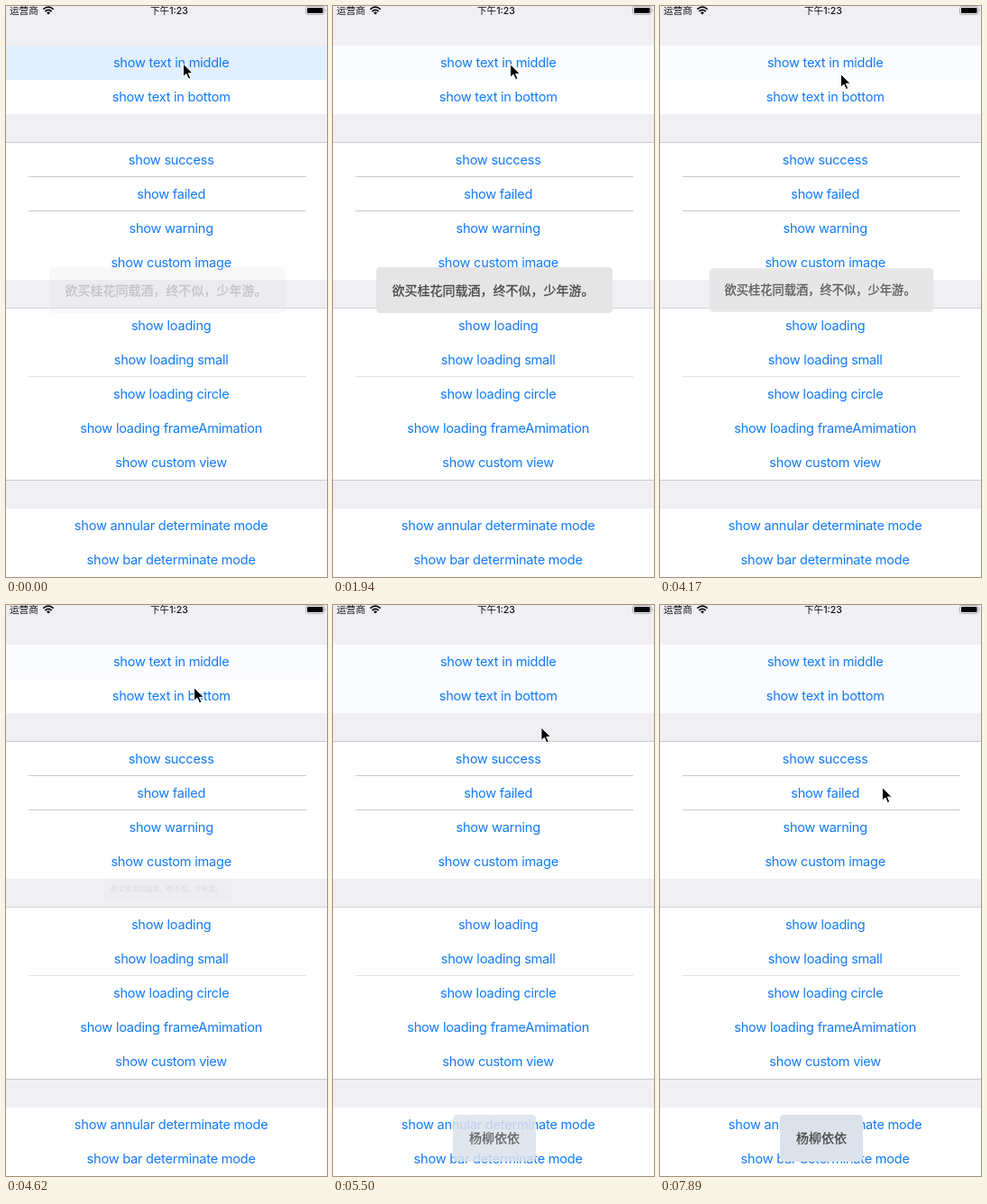
These frames come from a looping animation (356x634 px, 8000 ms). An HTML page:

```html
<!DOCTYPE html>
<html lang="zh-CN">
<head>
<meta charset="utf-8">
<title>HUD demo</title>
<style>
html, body { margin: 0; width: 100%; height: 100%; overflow: hidden; background: #efeff4; }
svg { display: block; width: 100vw; height: 100vh; }
.row { font: 400 14.6px Inter, "Liberation Sans", sans-serif; letter-spacing: -.25px; fill: #117af8; text-anchor: middle; }
.bar { font: 500 10.6px Inter, "Noto Sans CJK SC", "Noto Sans CJK", sans-serif; fill: #111; }
.hud text { font: 400 14px "Noto Sans CJK SC", "Noto Sans CJK", sans-serif; fill: #484848; stroke: #484848; stroke-width: .3px; }
</style>
</head>
<body>
<svg viewBox="0 0 356 634" xmlns="http://www.w3.org/2000/svg">
  <rect width="356" height="634" fill="#efeff4"/>
  <g id="table"></g>

  <g class="bar">
    <text x="4" y="9">运营商</text>
    <text x="181" y="9" text-anchor="middle">下午1:23</text>
  </g>
  <g fill="none" stroke="#000" stroke-width="1.7">
    <path d="M41.3 3.6Q47 -1.4 52.7 3.6M43.4 6Q47 2.8 50.6 6"/>
    <path d="M45 7.4Q47 5.8 49 7.4L47 9.6Z" fill="#000" stroke="none"/>
  </g>
  <rect x="332.5" y=".5" width="20.5" height="9" rx="2.2" fill="none" stroke="#a0a0a4" stroke-width=".8"/>
  <rect x="334" y="2" width="17.5" height="6" rx="1"/>
  <path d="M354 3.5q1.6 1.5 0 3z" fill="#a0a0a4"/>

  <g class="hud" id="middle">
    <rect x="48" y="290" width="262" height="51" rx="4.5" fill="#e5e5e5"/>
    <text x="65.5" y="320.5">欲买桂花同载酒，终不似，少年游。</text>
  </g>
  <g class="hud" id="bottom">
    <rect x="133" y="566" width="92" height="52" rx="4.5" fill="#dbe2eb"/>
    <text x="151" y="597">杨柳依依</text>
  </g>

  <path id="cursor" d="M0 0V14.6L3.4 11.5L5.9 17L8.3 16L5.9 10.7H10.6Z" stroke="#fff" stroke-linejoin="round"/>
</svg>
<script>
const $ = id => document.getElementById(id);
const LOOP = 8000, TICK = 148.5; // the picture refreshes once per tick
const ROW = 38, GAP = 32;

function add(name, attrs, text = '') {
  const el = document.createElementNS('http://www.w3.org/2000/svg', name);
  for (const k in attrs) el.setAttribute(k, attrs[k]);
  el.textContent = text;
  return $('table').appendChild(el);
}

const line = (y, inset, stroke = '#c9c9ce') =>
  add('line', { x1: inset, x2: inset ? 333 : 356, y1: y, y2: y, stroke });

const sections = [
  ['text in middle', 'text in bottom'],
  ['success', 'failed', 'warning', 'custom image'],
  ['loading', 'loading small', 'loading circle', 'loading frameAmimation', 'custom view'],
  ['annular determinate mode', 'bar determinate mode']
];
const cells = [];
let y = 44;
for (const labels of sections) {
  for (const label of labels) {
    cells.push(add('rect', { y, width: 356, height: ROW, fill: '#fff' }));
    add('text', { class: 'row', x: 183.2, y: y + 24.3 }, 'show ' + label);
    y += ROW;
  }
  y += GAP;
}
line(151.5, 0);
line(189.5, 25);
line(227.5, 25);
line(335.5, 0, '#d4d4d8');
line(411.5, 25, '#e2e2e5');
line(526.5, 0);

// eased progress from tick a to tick b
function ramp(t, a, b) {
  const p = Math.min(1, Math.max(0, (t - a) / (b - a)));
  return p * p * (3 - 2 * p);
}

const moves = [
  { from: 12, to: 19, x: 200.5, y: 75.5 },
  { from: 29, to: 32, x: 211.5, y: 97.5 },
  { from: 35, to: 41, x: 286.5, y: 245.5 },
  { from: 46, to: 51, x: 246.5, y: 202.5 }
];

function pointer(t) {
  let x = 196.5, y = 64;
  for (const m of moves) {
    const p = ramp(t, m.from, m.to);
    x += (m.x - x) * p;
    y += (m.y - y) * p;
  }
  return `translate(${x} ${y})`;
}

const idle = [250, 252, 255], lit = [226, 239, 254];

// white until tapped, then a highlight that fades
function glow(t, tap) {
  if (t < tap) return '#fff';
  const p = 1 - ramp(t, tap, tap + 3);
  return `rgb(${idle.map((v, i) => Math.round(v + (lit[i] - v) * p))})`;
}

function draw(ms) {
  const t = Math.floor(ms / TICK);
  const hide = ramp(t, 27, 32);
  $('cursor').setAttribute('transform', pointer(t));
  $('middle').setAttribute('opacity', ramp(t, -1.5, 3) * (1 - hide));
  $('middle').setAttribute('transform', `translate(179 315.5) scale(${1 - hide / 2}) translate(-179 -315.5)`);
  $('bottom').setAttribute('opacity', ramp(t, 34, 38));
  cells[0].setAttribute('fill', glow(t, 0));
  cells[1].setAttribute('fill', glow(t, 34));
}

const start = performance.now();
function loop() {
  draw((performance.now() - start) % LOOP);
  requestAnimationFrame(loop);
}
loop();
</script>
</body>
</html>
```
